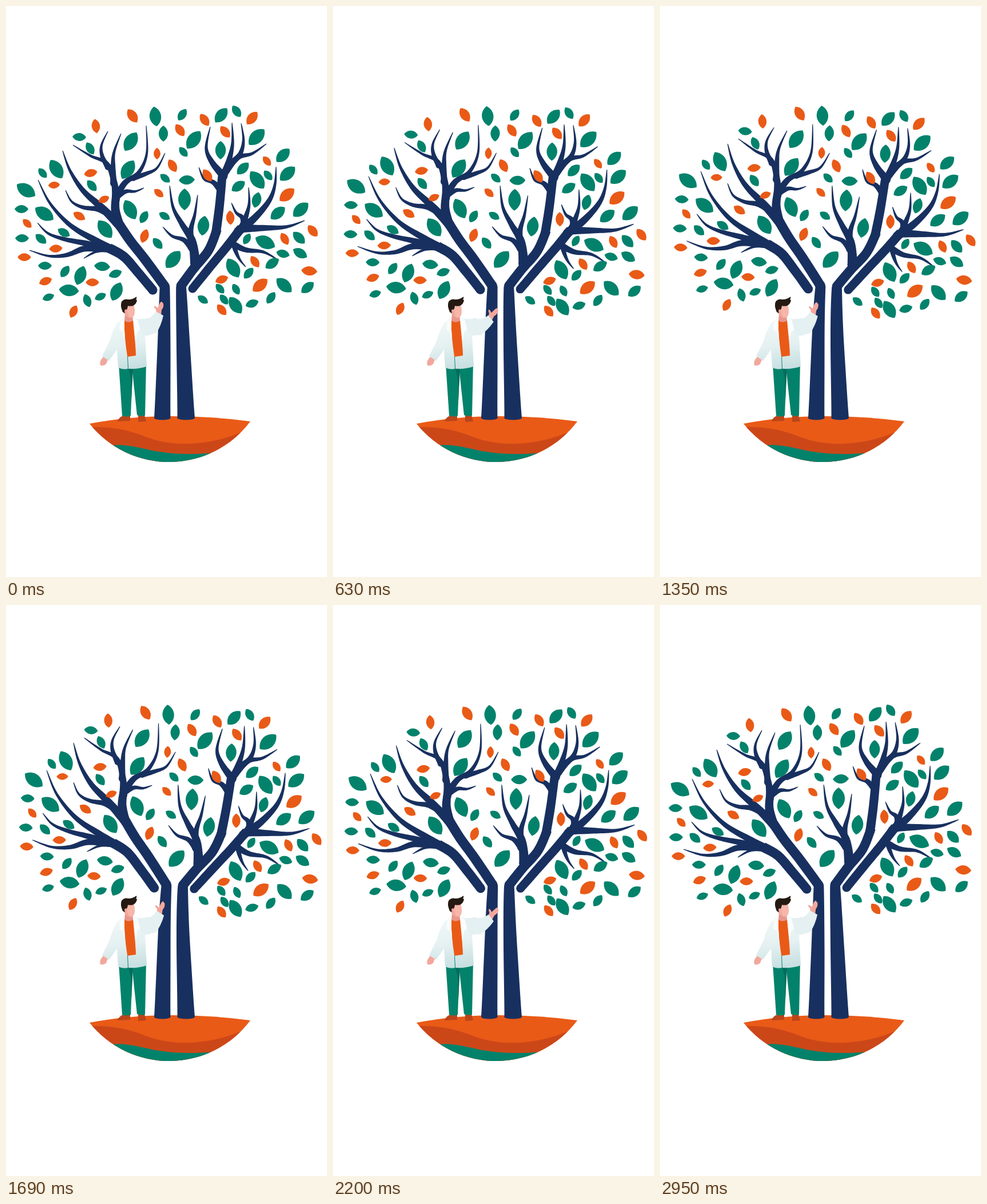
Recreate the animation shown at these times as an HTML page with a canvas. Size 561x998 px, loop 3010 ms.

```html
<!DOCTYPE html>
<html lang="en">
<head>
<meta charset="utf-8">
<title>Swaying tree</title>
<style>
  html, body { margin: 0; width: 100%; height: 100%; overflow: hidden; background: #fff; }
  canvas { display: block; width: 561px; height: 998px; }
</style>
</head>
<body>
<canvas id="stage" width="561" height="998"></canvas>
<script>
const ctx = document.getElementById('stage').getContext('2d');
const LOOP = 3010, TAU = Math.PI * 2;
const NAVY = '#18305f', GREEN = '#03826b', ORANGE = '#e95a17', SKIN = '#f2a79c';
const AXIS = 290, FORK = 485, ROOT = 640, LEAN = 0.068, PUSH = 3.5;

// Bend of the tree: rigid turn above the fork, cantilever below it.
function warp(x, y, k, rigid) {
  const dx = x - AXIS, side = (dx / 250) ** 2;
  const pull = 3 * k * side * Math.min(1.3, Math.max(0, (y - 250) / 200));
  if (y < FORK || rigid) {
    const a = LEAN * k, c = Math.cos(a), s = Math.sin(a), up = FORK - y;
    return [AXIS + dx * c + up * s + PUSH * k - pull, FORK + dx * s - up * c];
  }
  const u = Math.max(0, (ROOT - y) / (ROOT - FORK));
  return [x + (PUSH * u ** 3 - 0) * k - pull * u, y + LEAN * k * u * u * dx];
}

const spline = (a, b, c, d, t) =>
  0.5 * (2 * b + (c - a) * t + (2 * a - 5 * b + 4 * c - d) * t * t + (3 * b - a - 3 * c + d) * t ** 3);

// Tapered limb along a smooth curve, from its base to its tip.
function limb(w0, w1, xy, cap = true) {
  const pts = [];
  for (let i = 0; i < xy.length; i += 2) pts.push([xy[i], xy[i + 1]]);
  const n = pts.length - 1, mid = [], left = [], right = [];
  const at = i => pts[Math.max(0, Math.min(n, i))];
  for (let i = 0; i < n; i++)
    for (let j = 0; j < 9 + (i === n - 1); j++)
      mid.push([0, 1].map(q => spline(at(i - 1)[q], at(i)[q], at(i + 1)[q], at(i + 2)[q], j / 9)));
  mid.forEach((p, i) => {
    const a = mid[Math.max(0, i - 1)], b = mid[Math.min(mid.length - 1, i + 1)];
    const len = Math.hypot(b[0] - a[0], b[1] - a[1]) || 1;
    const h = (w0 + (w1 - w0) * i / (mid.length - 1)) / 2;
    const nx = (a[1] - b[1]) / len * h, ny = (b[0] - a[0]) / len * h;
    left.push([p[0] + nx, p[1] + ny]);
    right.unshift([p[0] - nx, p[1] - ny]);
  });
  return { outline: left.concat(right), base: mid[0], r: cap ? w0 / 2 : 0 };
}
const twig = (w, ...xy) => limb(w, 1, xy);

const limbs = [
  // trunks
  limb(28.5, 17.5, [273.2, 720, 276, 600, 277.5, 490], false),
  limb(30.5, 17.5, [314.7, 720, 310, 600, 306, 490], false),
  // left main limb
  limb(17, 17, [277.5, 490, 243, 443, 217, 410, 194, 376]),
  limb(17, 13, [196, 378, 191, 355, 192, 330]),
  twig(17, 200, 385, 168, 353, 135, 323, 112, 288, 99, 253),
  twig(12, 180, 364, 160, 355, 135, 352, 115, 342, 104, 322),
  twig(14, 192, 338, 189, 308, 176, 275, 148, 262, 117, 243),
  twig(10, 178, 282, 168, 262, 167, 243, 178, 219),
  twig(12, 188, 310, 187, 280, 189, 255, 201, 223),
  twig(13, 192, 335, 208, 309, 232, 291, 246, 258, 245, 209),
  twig(10, 222, 301, 245, 293, 264, 283, 278, 257),
  twig(10, 196, 332, 210, 324, 226, 324, 241, 318),
  // left lower limb
  limb(16, 17, [256.5, 496.5, 231, 466, 206, 438, 180, 423]),
  twig(15, 190, 428, 155, 409, 112, 383, 77, 345, 56, 304),
  twig(13, 180, 424, 140, 415, 100, 407, 73, 397, 55, 379),
  twig(14, 182, 424, 138, 424, 107, 435, 75, 437, 41, 427),
  twig(9, 182, 426, 158, 429, 136, 441),
  // right main limb
  limb(17, 16, [306, 489, 328, 459, 354, 427, 369, 390]),
  limb(16, 15, [367, 396, 373, 350, 378, 296]),
  twig(18, 331, 450, 325, 410, 308, 382, 292, 352, 286, 314),
  twig(12, 325, 424, 311, 409, 290, 402, 274, 386),
  twig(13, 324, 422, 323, 392, 330, 364, 335, 330),
  twig(14, 379, 296, 360, 273, 350, 248, 357, 211),
  twig(12, 375, 322, 362, 308, 346, 302, 337, 282),
  twig(14, 380, 298, 390, 269, 396, 240, 395, 204),
  twig(12, 392, 276, 409, 259, 415, 235, 411, 205),
  twig(13, 384, 289, 405, 265, 430, 258, 455, 241),
  // right lower limb
  limb(15, 16, [326, 494, 360, 452, 388, 418, 411, 388]),
  twig(16, 406, 394, 435, 370, 460, 340, 470, 312, 472, 281),
  twig(15, 411, 389, 450, 388, 490, 386, 522, 375),
  twig(12, 416, 386, 413, 370, 402, 361, 394, 344),
  twig(12, 412, 387, 420, 366, 425, 345, 424, 317),
  twig(13, 391, 413, 418, 426, 450, 430, 477, 445),
  twig(10, 396, 411, 402, 430, 409, 444, 419, 456)
];

// Leaves: x, y, angle in degrees; one list for each size.
const groups = [
  [GREEN, 38, [
    35, 322, 32, 67, 363, 33, 88, 285, 58, 213, 286, -57, 217, 356, 62, 173, 390, 53,
    218, 237, -57, 292, 443, -50, 328, 234, -53, 312, 338, 90, 439, 304, 52, 453, 413, 25,
    397, 458, 60, 438, 229, -45]],
  [GREEN, 35, [
    261, 193, 82, 345, 384, -82, 486, 488, 42, 130, 471, -70, 110, 497, 5, 193, 499, -65,
    401, 523, 54, 515, 356, -42, 492, 293, -42]],
  [GREEN, 32, [
    376, 191, -50, 375, 252, 90, 475, 362, -40, 484, 261, -45]],
  [GREEN, 28, [
    275, 223, 90, 316, 304, -3, 168, 455, 5, 406, 315, -35, 414, 284, -45, 438, 339, -75,
    512, 405, 45, 514, 432, 30, 465, 450, -35, 527, 492, -40]],
  [GREEN, 24, [
    308, 190, -55, 403, 184, 55, 128, 229, 3, 147, 249, 60, 150, 314, 50, 27, 355, 0,
    28, 406, 0, 61, 407, 40, 101, 396, 30, 68, 454, 0, 103, 464, -55, 191, 468, -20,
    142, 515, 70, 241, 369, -60, 265, 415, 50, 484, 433, 15, 424, 467, -50, 463, 510, -55,
    430, 520, -20]],
  [GREEN, 21.5, [
    64, 292, 50, 310, 255, 50, 278, 301, 40, 277, 367, 30, 74, 509, -20, 165, 508, -25,
    344, 513, 35, 374, 494, 50, 381, 513, 52, 402, 495, 60, 421, 407, -60, 458, 296, 50]],
  [ORANGE, 33, [444, 488, -40, 491, 330, -40]],
  [ORANGE, 28, [430, 196, -50, 221, 192, 55, 530, 463, 5]],
  [ORANGE, 25, [
    157, 210, 82, 291, 279, 60, 304, 217, 55, 347, 199, 55, 383, 220, 50, 352, 296, 55,
    392, 370, 87, 242, 402, -70, 536, 393, 50]],
  [ORANGE, 23.5, [
    148, 292, -12, 128, 367, 30, 32, 439, 0, 87, 424, -5, 69, 481, -20, 151, 483, 0,
    118, 534, -65, 377, 478, -20, 377, 531, 50, 435, 447, 55, 487, 407, 60]],
  [ORANGE, 20.5, [
    84, 313, -5, 171, 338, -25, 37, 380, 45, 267, 327, 40, 264, 258, 90, 456, 271, 50]]
];

function fill(color, path) {
  ctx.fillStyle = color;
  ctx.beginPath();
  ctx.fill(new Path2D(path));
}

function drawLimb({ outline, base, r }, k) {
  ctx.beginPath();
  for (const p of outline) ctx.lineTo(...warp(p[0], p[1], k));
  ctx.closePath();
  ctx.fill();
  if (!r) return;
  ctx.beginPath();
  ctx.arc(...warp(base[0], base[1], k), r, 0, TAU);
  ctx.fill();
}

function drawLeaf(x, y, deg, size, k) {
  const a = size / 2, h = size * 0.385;
  ctx.save();
  ctx.translate(...warp(x, y, k, true));
  ctx.rotate(deg * Math.PI / 180 + LEAN * k);
  ctx.beginPath();
  ctx.moveTo(-a, 0);
  ctx.bezierCurveTo(-a * 0.5, -h, a * 0.5, -h, a, 0);
  ctx.bezierCurveTo(a * 0.5, h, -a * 0.5, h, -a, 0);
  ctx.fill();
  ctx.restore();
}

function drawTree(k) {
  ctx.fillStyle = NAVY;
  for (const l of limbs) drawLimb(l, k);
  ctx.beginPath();
  ctx.ellipse(273.2, 720, 14.2, 3.6, 0, 0, TAU);
  ctx.ellipse(314.7, 720, 15.2, 3.6, 0, 0, TAU);
  ctx.fill();
  for (const [color, size, list] of groups) {
    ctx.fillStyle = color;
    for (let i = 0; i < list.length; i += 3) drawLeaf(list[i], list[i + 1], list[i + 2], size, k);
  }
}

const bowl = new Path2D('M146 730 Q214 717 290 717 Q360 717 427 726 A177.5 177.5 0 0 1 146 730Z');
function drawGround() {
  ctx.save();
  ctx.clip(bowl);
  ctx.fillStyle = ORANGE;
  ctx.fillRect(140, 700, 300, 110);
  fill('#cc4718', 'M140 736 C200 734 224 746 256 757 C305 772 366 766 420 741 V810 H140Z');
  fill(GREEN, 'M180 768 C214 764 240 775 268 779 C296 784 330 784 365 781 V810 H180Z');
  ctx.restore();
}

const cloth = ctx.createLinearGradient(190, 545, 205, 636);
cloth.addColorStop(0, '#f2f9f9');
cloth.addColorStop(0.55, '#e4f0f1');
cloth.addColorStop(1, '#c6dfe0');

function drawMan(wave) {
  // shoes, trousers
  fill('#b9451b', 'M195 726 Q196 720 206 715 H217 V725Z M231 715 H242 L245 726 L231 727Z');
  fill(GREEN, 'M197 626 L215 610 L245 624 L243 716 Q236 718 229 715 L221 640 L218 716 Q211 719 203 716Z');
  fill('#046c5b', 'M213 628 L222 628 L221 652 L219 690 L218 652Z');
  // left hand and sleeve
  fill(SKIN, 'M170 613 L179 617 Q176 621 176 624 Q172 630 165 628 Q163 622 167 617Z');
  fill(cloth, 'M194 554 Q185 570 181 586 L168 612 L180 620 L193 602 L203 570Z');
  // shirt, neck
  fill(ORANGE, 'M206 550 L222 549 L228 612 Q218 615 210 612Z');
  fill('#e9968b', 'M208 538 L221 540 L222 550 Q214 555 207 550Z');
  // coat
  fill(cloth, 'M207 544 Q199 551 194 554 Q189 572 194 601 L196 632 Q204 636 213 634 L212 612 Q207 580 206 551Z');
  fill(cloth, 'M222 543 Q232 549 239 548 L243 576 L246 630 Q232 635 214 634 L213 613 L227 611 Q226 570 222 543Z');
  fill('#fafdfd', 'M207 545 L200 552 L198 566 L204 569 L207 583Z M222 544 L232 551 L236 565 L229 570 L227 586Z');
  // right arm; the forearm turns at the elbow
  fill('#e4f0f1', 'M230 547 Q240 548 249 545 L260 570 Q252 577 242 576 L236 572Z');
  ctx.save();
  ctx.translate(250, 561);
  ctx.rotate(wave * 0.42);
  ctx.translate(-250, -561);
  fill(SKIN, 'M263 540 L262 530 Q258 527 259 524 Q263 525 265 528 L269 519 Q272 515 273 518 L275 520 Q276 527 272 531 L271 541Z');
  fill('#e4f0f1', 'M243 548 Q255 546 262 534 L275 541 Q271 559 263 571 Q252 577 243 570Z');
  ctx.restore();
  // head
  fill(SKIN, 'M206 524 L223 521 Q226 532 224 540 Q221 547 215 545 Q208 542 206 535Z');
  fill('#f6b6aa', 'M211 525 L223 523 Q226 532 224 540 Q221 545 216 544 Q211 538 211 525Z');
  fill('#251a12', 'M204 535 Q199 523 202 517 Q206 511 214 513 Q222 513 228 508 Q229 511 227 513 L229 514 Q228 521 222 524 Q217 525 213 524 Q212 531 210 531 Q208 528 207 533 L208 537Z');
}

function draw(t) {
  const turn = TAU * t / LOOP;
  const lean = 0.5 - 0.5 * Math.cos(turn) + 0.025 * Math.sin(turn) ** 2;
  const wave = 0.5 - 0.5 * Math.cos(2 * turn);
  ctx.fillStyle = '#fff';
  ctx.fillRect(0, 0, 561, 998);
  drawGround();
  drawTree(lean);
  drawMan(wave);
}

const start = performance.now();
function tick() {
  draw((performance.now() - start) % LOOP);
  requestAnimationFrame(tick);
}
tick();
</script>
</body>
</html>
```
